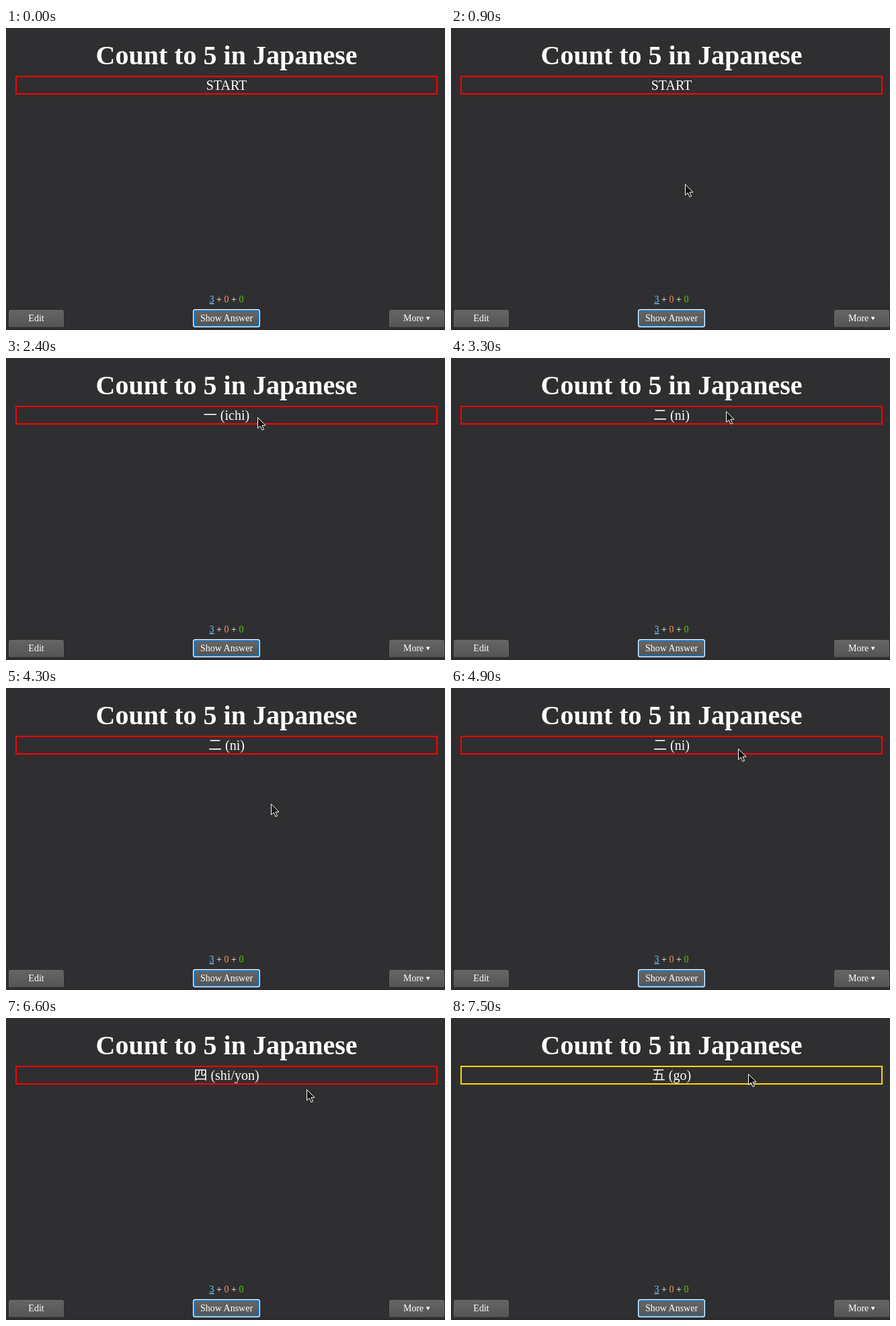
Recreate the animation shown at these times as an HTML page. Size 653 px wide and 449 px high, loop 8000 ms.

```html
<!DOCTYPE html>
<html lang="en">
<head>
<meta charset="utf-8">
<title>Counting card</title>
<style>
html, body { margin: 0; width: 100%; height: 100%; overflow: hidden; background: #2f2f31; }
svg { display: block; width: 653px; height: 449px; }
text { font-family: "Liberation Serif", "Noto Sans CJK JP", "Noto Sans CJK", serif; fill: #fff; white-space: pre; }
.title { font-size: 40px; font-weight: bold; }
.word { font-size: 20px; }
.small { font-size: 14px; }
.mid { text-anchor: middle; }

/* Hard changes on a 100 ms grid: 1.25% per step */
.word, .frame, .mouse, .arrow, .beam { animation: 8s step-end infinite; }
.word { opacity: 0; }
.w0 { animation-name: w0; }
.w1 { animation-name: w1; }
.w2 { animation-name: w2; }
.w3 { animation-name: w3; }
.w4 { animation-name: w4; }
.w5 { animation-name: w5; }
@keyframes w0 { 0% { opacity: 1 } 27.5%, 100% { opacity: 0 } }
@keyframes w1 { 0% { opacity: 0 } 27.5% { opacity: 1 } 41.25%, 100% { opacity: 0 } }
@keyframes w2 { 0% { opacity: 0 } 41.25% { opacity: 1 } 65%, 100% { opacity: 0 } }
@keyframes w3 { 0% { opacity: 0 } 65% { opacity: 1 } 76.25%, 100% { opacity: 0 } }
@keyframes w4 { 0% { opacity: 0 } 76.25% { opacity: 1 } 93.75%, 100% { opacity: 0 } }
@keyframes w5 { 0% { opacity: 0 } 93.75%, 100% { opacity: 1 } }

.frame { fill: none; stroke: #f00; stroke-width: 2; animation-name: frame; }
@keyframes frame { 0% { stroke: #f00 } 93.75%, 100% { stroke: #ffd700 } }

.arrow { animation-name: arrow; }
.beam { animation-name: beam; }
@keyframes arrow { 0% { opacity: 1 } 18.75% { opacity: 0 } 30%, 100% { opacity: 1 } }
@keyframes beam { 0% { opacity: 0 } 18.75% { opacity: 1 } 30%, 100% { opacity: 0 } }

.mouse { animation-name: mouse; }
@keyframes mouse {
  0% { transform: translate(-40px, -40px) }
  6.25% { transform: translate(299px, 201px) }
  7.5% { transform: translate(339px, 281px) }
  10% { transform: translate(344px, 257px) }
  11.25% { transform: translate(348px, 232px) }
  13.75% { transform: translate(348px, 216px) }
  15% { transform: translate(347px, 178px) }
  16.25% { transform: translate(345px, 138px) }
  17.5% { transform: translate(343px, 106px) }
  18.75% { transform: translate(341px, 86px) }
  20% { transform: translate(341px, 88px) }
  28.75% { transform: translate(350px, 88px) }
  30% { transform: translate(374px, 88px) }
  31.25% { transform: translate(396px, 83px) }
  32.5% { transform: translate(409px, 79px) }
  51.25% { transform: translate(404px, 96px) }
  52.5% { transform: translate(396px, 132px) }
  53.75% { transform: translate(394px, 172px) }
  55% { transform: translate(410px, 201px) }
  56.25% { transform: translate(443px, 204px) }
  57.5% { transform: translate(465px, 174px) }
  58.75% { transform: translate(455px, 132px) }
  60% { transform: translate(437px, 102px) }
  61.25% { transform: translate(427px, 90px) }
  66.25% { transform: translate(434px, 180px) }
  70% { transform: translate(434px, 164px) }
  71.25% { transform: translate(435px, 131px) }
  72.5% { transform: translate(435px, 108px) }
  73.75% { transform: translate(434px, 96px) }
  75% { transform: translate(434px, 87px) }
  77.5% { transform: translate(435px, 89px) }
  78.75% { transform: translate(437px, 97px) }
  80% { transform: translate(439px, 105px) }
  81.25% { transform: translate(444px, 105px) }
  82.5% { transform: translate(447px, 106px) }
  90% { transform: translate(444px, 94px) }
  91.25%, 100% { transform: translate(442px, 83px) }
}
</style>
</head>
<body>
<svg viewBox="0 0 653 449">
  <defs>
    <linearGradient id="face" x2="0" y2="1">
      <stop stop-color="#656565"/>
      <stop offset="1" stop-color="#555"/>
    </linearGradient>
    <g id="button">
      <rect x="-.5" y="-.5" width="83" height="27" rx="3" fill="#232324" opacity=".6"/>
      <rect x=".5" y=".5" width="81" height="25" rx="2" fill="url(#face)" stroke="#646464"/>
      <path d="M2 25.5H80" stroke="#4a4a4a"/>
    </g>
  </defs>
  <rect width="653" height="449" fill="#2f2f31"/>

  <text class="title mid" x="328" y="54">Count to 5 in Japanese</text>
  <rect class="frame" x="15" y="72" width="626" height="26"/>
  <g class="mid" lang="ja">
    <text class="word w0" x="328" y="92">START</text>
    <text class="word w1" x="328" y="92">一 (ichi)</text>
    <text class="word w2" x="328" y="92">二 (ni)</text>
    <text class="word w3" x="328" y="92">三 (san)</text>
    <text class="word w4" x="328" y="92">四 (shi/yon)</text>
    <text class="word w5" x="328" y="92">五 (go)</text>
  </g>

  <path d="M0 386.5H653M0 448.5H653" stroke="#29292b"/>
  <text class="small mid" x="328" y="408"><tspan fill="#7cf" text-decoration="underline">3</tspan> + <tspan fill="#ff935b">0</tspan> + <tspan fill="#5ccc00">0</tspan></text>

  <use href="#button" x="4" y="419"/>
  <text class="small mid" x="45" y="436">Edit</text>

  <rect x="278" y="418" width="100" height="27" rx="3.5" fill="#fff"/>
  <rect x="279.2" y="419.2" width="97.6" height="24.6" rx="2.5" fill="#0b78d0"/>
  <rect x="281" y="421" width="94" height="21" rx="1" fill="url(#face)"/>
  <text class="small mid" x="328" y="436">Show Answer</text>

  <use href="#button" x="570" y="419"/>
  <text class="small" x="591" y="436">More</text>
  <path d="M624.8 429.5h5.8l-2.9 5z" fill="#fff"/>

  <g class="mouse">
    <path class="arrow" d="M.5 .5V16.5L4.2 13.1L7 19.2L9.6 18L6.9 12.2H12Z" fill="#111" stroke="#fff"/>
    <g class="beam" fill="none">
      <path d="M-3.5-7.5H4.5M-3.5 7.5H4.5M.5-7.5V7.5" stroke="#fff" stroke-width="3"/>
      <path d="M-3-7.5H4M-3 7.5H4M.5-7.5V7.5" stroke="#111"/>
    </g>
  </g>
</svg>
</body>
</html>
```
